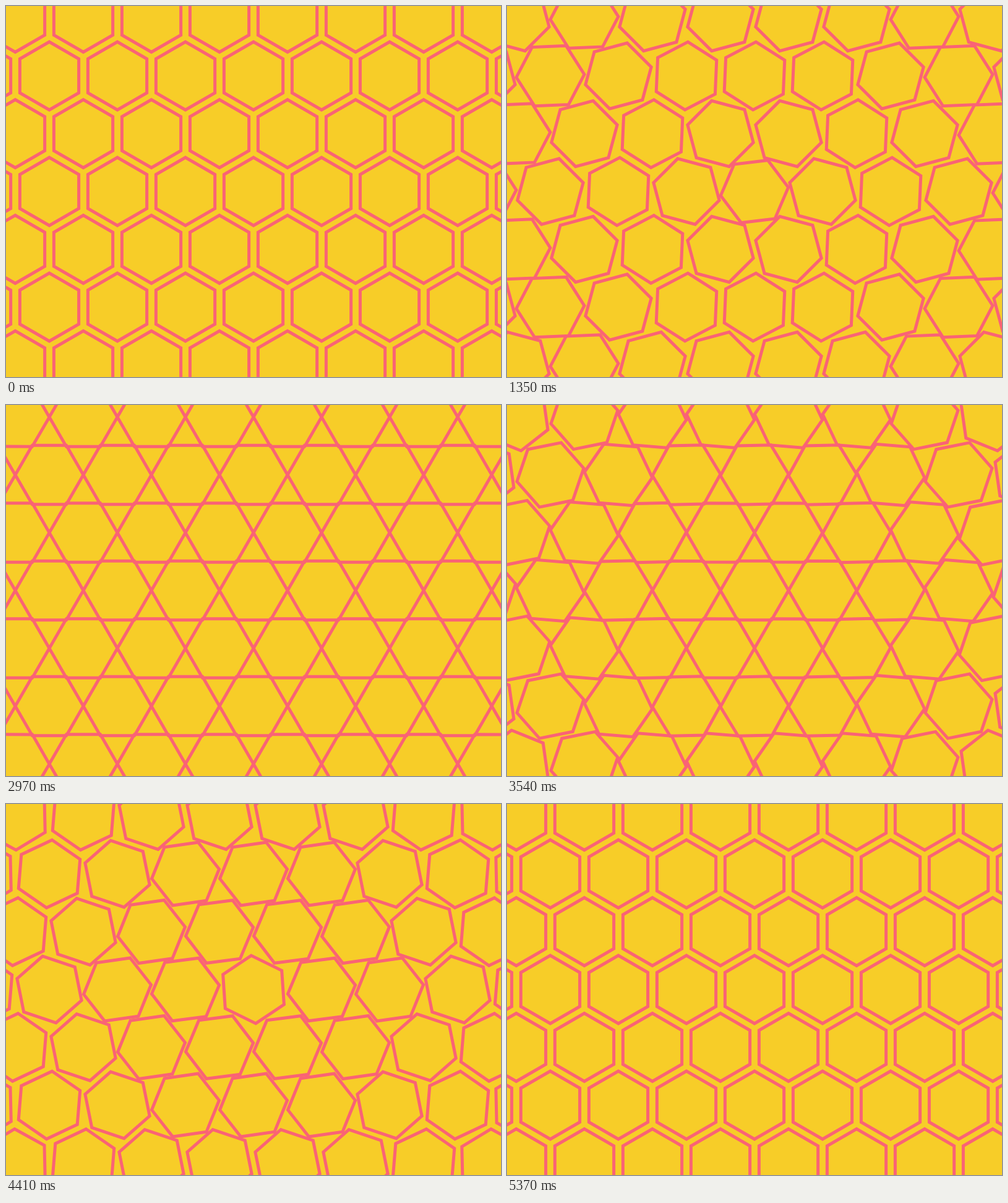
Write an HTML page with a canvas that moves like this. It is 800 px wide and 600 px high and loops after 5.4 s.

```html
<!DOCTYPE html>
<html lang="en">
<head>
<meta charset="utf-8">
<title>Turning hexagons</title>
<style>
  html, body { margin: 0; width: 100%; height: 100%; overflow: hidden; background: #f7cd28; }
  canvas { display: block; width: 800px; height: 600px; }
</style>
</head>
<body>
<canvas id="stage" width="800" height="600"></canvas>
<script>
const ctx = document.getElementById('stage').getContext('2d');
const LOOP = 5400, STEP = 30;
const RADIUS = 55, ROW = 93.5;
const STAGGER = 150, TURN = 1800;

// Honeycomb cells, each with its ring number around the centre cell.
const cells = [];
for (let row = -4; row <= 4; row++) {
  const shift = row % 2 ? 0.5 : 0;
  for (let i = -5; i <= 5; i++) {
    const col = i + shift;
    const r = Math.abs(row);
    const ring = Math.max(r, Math.abs(col) + r / 2);
    cells.push({ x: 400 + col * RADIUS * 2, y: 300 + row * ROW, ring });
  }
}

function ease(p) {
  const power = 2.7;
  return p < 0.5 ? Math.pow(2 * p, power) / 2 : 1 - Math.pow(2 - 2 * p, power) / 2;
}

function hexagon(x, y, turn) {
  ctx.beginPath();
  for (let k = 0; k < 6; k++) {
    const a = turn - Math.PI / 2 + k * Math.PI / 3;
    ctx.lineTo(x + RADIUS * Math.cos(a), y + RADIUS * Math.sin(a));
  }
  ctx.closePath();
  ctx.stroke();
}

function draw(time) {
  // The second half of the loop plays the first half backwards.
  const t = Math.min(time, LOOP - time);
  ctx.fillStyle = '#f7cd28';
  ctx.fillRect(0, 0, 800, 600);
  ctx.strokeStyle = '#fa6375';
  ctx.lineWidth = 5;
  ctx.lineJoin = 'miter';
  for (const { x, y, ring } of cells) {
    const p = Math.min(1, Math.max(0, (t - ring * STAGGER) / TURN));
    const direction = ring % 2 ? -1 : 1;
    hexagon(x, y, direction * ease(p) * Math.PI / 2);
  }
}

const start = performance.now();
function tick() {
  const time = (performance.now() - start) % LOOP;
  draw(Math.floor(time / STEP) * STEP);
  requestAnimationFrame(tick);
}
tick();
</script>
</body>
</html>
```
